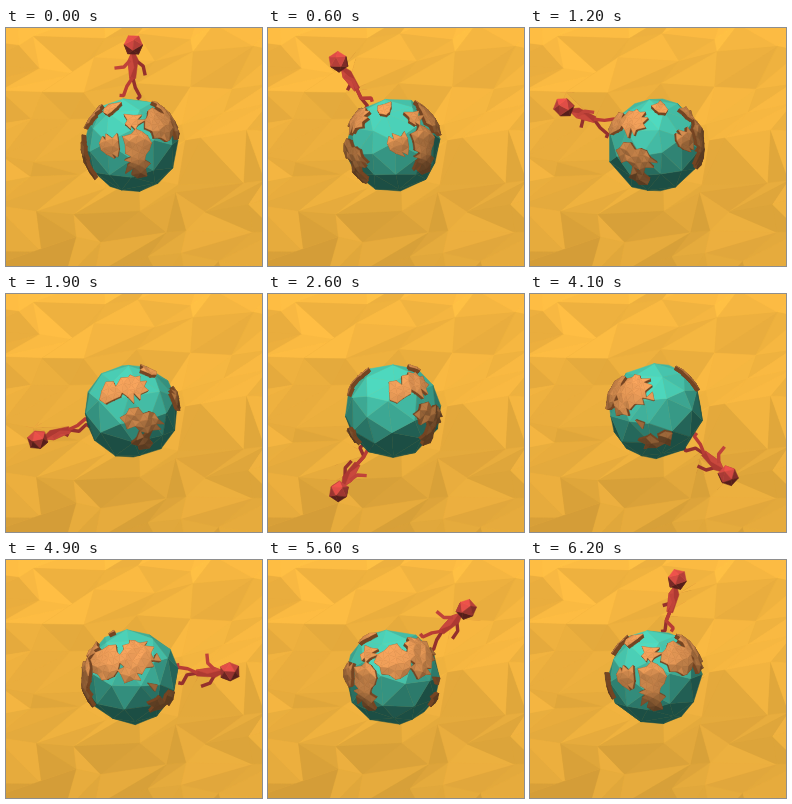
Write an HTML page with a canvas that moves like this. It is 256x238 px and loops after 6300 ms.

```html
<!DOCTYPE html>
<html>
<head>
<meta charset="utf-8">
<style>
html, body { margin: 0; width: 100%; height: 100%; overflow: hidden; background: #eaaf42 }
canvas { display: block }
</style>
</head>
<body>
<canvas id="stage" width="256" height="238"></canvas>
<script>
const ctx = document.getElementById('stage').getContext('2d');
const CX = 125, CY = 117, R = 48, LAND_R = 49.5;
const TILT = 0.21, ROLL = 0.08, STEP = Math.PI * 2 / 64;
const LIGHT = unit([-0.15, 0.68, 0.72]);
const OCEAN = [78, 216, 190], EARTH = [246, 163, 92], SKIN = [240, 82, 76];

function unit(p) { const l = Math.hypot(...p); return p.map(v => v / l); }
function dot(a, b) { return a[0] * b[0] + a[1] * b[1] + a[2] * b[2]; }
function cross(a, b) {
  return [a[1] * b[2] - a[2] * b[1], a[2] * b[0] - a[0] * b[2], a[0] * b[1] - a[1] * b[0]];
}
function sub(a, b) { return a.map((v, i) => v - b[i]); }
function spin(p, i, j, angle) {
  const q = [...p], c = Math.cos(angle), s = Math.sin(angle);
  q[i] = p[i] * c - p[j] * s;
  q[j] = p[i] * s + p[j] * c;
  return q;
}
const toView = (p, frame) => spin(spin(spin(p, 2, 0, frame * STEP), 2, 1, -TILT), 0, 1, ROLL);
const toWorld = (p, frame) => spin(spin(spin(p, 0, 1, -ROLL), 2, 1, TILT), 2, 0, -frame * STEP);

// Subdivided icosahedron with irregular corners and slightly uneven height.
function makeMesh(n, jitter, relief) {
  const g = (1 + Math.sqrt(5)) / 2, corners = [], faces = [];
  for (const a of [-1, 1]) for (const b of [-g, g]) corners.push([0, a, b], [a, b, 0], [b, 0, a]);
  const near = (a, b) => Math.abs(Math.hypot(...sub(a, b)) - 2) < 0.01;
  const bend = p => {
    const u = unit(p), height = 1 + relief * Math.sin(23 * u[0] + 31 * u[1] + 19 * u[2]);
    return unit(u.map((v, i) => v + jitter * Math.sin(17 * u[(i + 1) % 3] + 9 * v))).map(v => v * height);
  };
  corners.forEach((a, i) => corners.forEach((b, j) => corners.forEach((c, k) => {
    if (!(i < j && j < k && near(a, b) && near(b, c) && near(a, c))) return;
    const at = (u, v) => bend(a.map((x, m) => (x * (n - u - v) + b[m] * u + c[m] * v) / n));
    for (let u = 0; u < n; u++) for (let v = 0; u + v < n; v++) {
      faces.push([at(u, v), at(u + 1, v), at(u, v + 1)]);
      if (u + v < n - 1) faces.push([at(u + 1, v), at(u + 1, v + 1), at(u, v + 1)]);
    }
  })));
  return faces;
}

function fill(points, color) {
  ctx.beginPath();
  points.forEach(p => ctx.lineTo(p[0], p[1]));
  ctx.closePath();
  ctx.fillStyle = ctx.strokeStyle = color;
  ctx.lineWidth = 0.5;
  ctx.fill();
  ctx.stroke();
}
function tint(color, k) { return `rgb(${color.map(v => Math.round(Math.min(255, v * k)))})`; }
function drawMesh(mesh, x, y, r, color, view, depth = 0) {
  const place = (p, size) => [x + size * p[0], y - size * p[1]];
  const front = [];
  for (const face of mesh) {
    const pts = face.map(view);
    let normal = unit(cross(sub(pts[1], pts[0]), sub(pts[2], pts[0])));
    if (dot(normal, pts[0]) < 0) normal = normal.map(v => -v);
    if (normal[2] > 0) front.push({ pts, light: 0.36 + 0.66 * Math.max(0, dot(normal, LIGHT)) });
  }
  if (depth) for (const { pts } of front) pts.forEach((p, i) => {
    const q = pts[(i + 1) % 3];
    fill([place(p, r), place(q, r), place(q, r - depth), place(p, r - depth)], '#754523');
  });
  for (const { pts, light } of front) fill(pts.map(p => place(p, r)), tint(color, light));
}

// Rounded pieces of land: the turn at which each is in view, screen position, radius.
const lands = [
  [0, 104, 118, 11], [0, 132, 117, 14], [0, 133, 136, 11], [0, 134, 146, 6],
  [0, 127, 92, 8], [0, 153, 95, 14], [12, 130, 79, 8],
  [19, 103, 99, 11], [19, 126, 92, 13], [33, 155, 93, 11],
  [19, 128, 125, 11], [19, 144, 129, 12], [19, 137, 148, 9],
  [41, 120, 149, 8], [41, 135, 146, 9], [41, 111, 130, 4], [41, 121, 102, 4],
  [49, 99, 101, 17], [49, 131, 95, 17], [49, 124, 112, 10]
].map(([frame, px, py, size]) => {
  const x = (px - CX) / LAND_R, y = (CY - py) / LAND_R;
  return { centre: toWorld([x, y, Math.sqrt(1 - x * x - y * y)], frame), reach: Math.cos(size / LAND_R) };
});
const globe = makeMesh(2, 0.1, 0.012), skull = makeMesh(1, 0.12, 0);
const terrain = makeMesh(8, 0.035, 0.015).filter(face => {
  const middle = unit(face[0].map((v, i) => v + face[1][i] + face[2][i]));
  return lands.some(land => dot(middle, land.centre) > land.reach);
});

// Crumpled paper: a jittered grid of triangles, brighter towards the top.
const paper = [];
function makePaper() {
  let seed = 7;
  const random = () => (seed = seed * 16807 % 2147483647) / 2147483647;
  const grid = Array.from({ length: 11 }, (_, j) => Array.from({ length: 9 }, (_, i) =>
    [(i - 1) * 43 + random() * 36 - j % 2 * 20, (j - 1) * 29 + random() * 24 - i * 2]));
  for (let j = 0; j < 10; j++) for (let i = 0; i < 8; i++) {
    const a = grid[j][i], b = grid[j][i + 1], c = grid[j + 1][i], d = grid[j + 1][i + 1];
    for (const tri of [[a, b, c], [b, d, c]]) {
      const y = (tri[0][1] + tri[1][1] + tri[2][1]) / 3;
      paper.push([tri, tint([234, 174, 62], 1.06 - y / 238 * 0.11 + (random() - 0.5) * 0.1)]);
    }
  }
}
makePaper();

function limb(x, y, parts, color) {
  ctx.beginPath();
  ctx.moveTo(x, y);
  for (const [angle, length] of parts)
    ctx.lineTo(x -= Math.sin(angle) * length, y += Math.cos(angle) * length);
  ctx.strokeStyle = color;
  ctx.lineWidth = 3.4;
  ctx.lineJoin = 'bevel';
  ctx.stroke();
}
function drawWalker(frame) {
  const angle = frame * STEP, phase = frame / 8 * Math.PI * 2;
  const turn = 0.02 - angle - 0.04 * Math.sin(-angle) * -1;
  const leg = (ph, color) => {
    const thigh = 0.15 + 0.42 * Math.cos(ph);
    const shin = thigh - 0.25 - 0.9 * Math.max(0, -Math.sin(ph));
    limb(0, -66, [[thigh, 10.5], [shin, 10], [shin + 1.3, 4]], color);
  };
  const arm = (x, ph, color) => {
    const upper = 0.95 * Math.cos(ph - 0.5) - 0.1;
    limb(x, -83, [[upper, 9], [upper + 0.7, 9.5]], color);
  };
  ctx.save();
  ctx.translate(125.4, 115.5);
  ctx.rotate(turn);
  arm(3, phase + Math.PI, '#94302d');
  leg(phase + Math.PI, '#94302d');
  fill([[-2, -90], [2, -90], [5, -84], [3, -65], [-3, -65], [-5, -83]], '#ad3932');
  fill([[-2, -90], [-5, -83], [-3, -65], [1, -76]], '#c9483d');
  leg(phase, '#b83c35');
  arm(-3, phase, '#c0433a');
  ctx.restore();
  drawMesh(skull, 125.4 + 98.5 * Math.sin(turn), 115.5 - 98.5 * Math.cos(turn), 10.5, SKIN,
    p => spin(p, 0, 1, -turn));
}

function draw(now) {
  const frame = Math.floor(now / 100) % 63, view = p => toView(p, frame);
  paper.forEach(([tri, color]) => fill(tri, color));
  drawWalker(frame);
  drawMesh(globe, CX, CY, R, OCEAN, view);
  drawMesh(terrain, CX, CY, LAND_R, EARTH, view, 4);
  requestAnimationFrame(() => draw(performance.now()));
}
draw(0);
</script>
</body>
</html>
```
